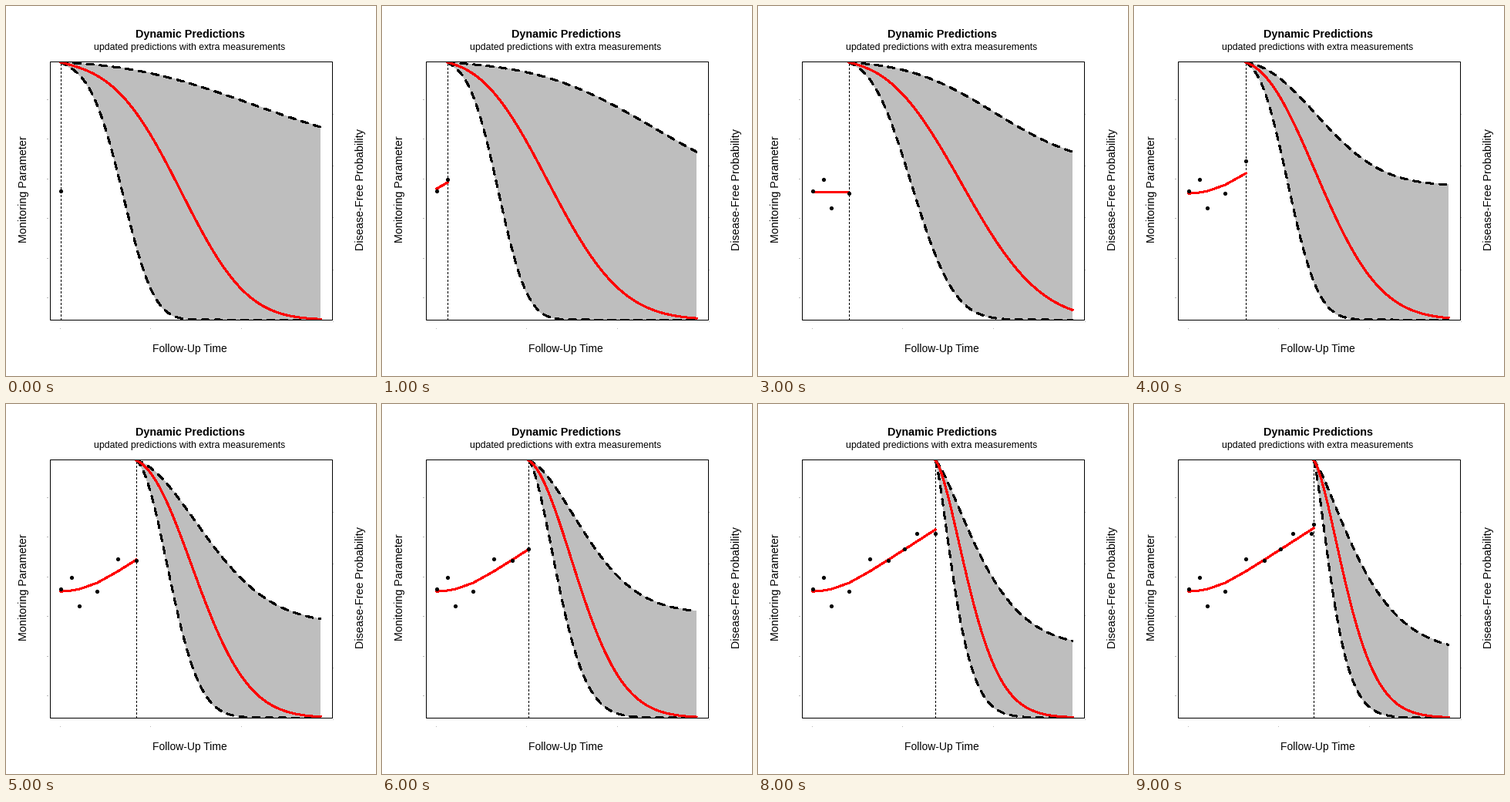
Recreate the animation shown at these times as a matplotlib script. Size 480 by 480 pixels, loop 10 s.

```python
import numpy as np
import matplotlib.pyplot as plt
from matplotlib.animation import FuncAnimation
from matplotlib.patches import Rectangle

DPI = 80
PX = 72 / DPI
LEFT, RIGHT, TOP, BOTTOM = 57, 423, 72, 407
START_Y, FULL, END = 73, 334, 408

VISITS_X = [71, 85, 95, 118, 145, 169, 190, 206, 230, 233]
VISITS_Y = [240, 225, 262, 243, 201, 203, 188, 168, 168, 156]

# Start of follow-up: depth, scale, shape of the upper limit,
# then scale, shape of the median and of the lower limit
CURVES = {
    71: (120, 330, 2.5, 188, 3.0, 95, 3.2),
    85: (170, 323, 3.0, 171, 2.5, 80, 2.9),
    95: (110, 318, 3.4, 238, 2.9, 132, 2.7),
    145: (160, 132, 2.2, 130, 2.2, 71, 2.5),
    169: (212, 128, 1.9, 108, 2.1, 61, 2.05),
    206: (188, 83, 1.75, 77, 1.8, 50, 1.6),
    233: (250, 83, 1.4, 60, 1.65, 35, 1.45),
}

# First and last height of the straight early trends
EARLY_TRENDS = {1: (237, 229), 2: (241, 244), 3: (241, 242)}


def fall(u, depth, scale, shape):
    """Survival curve: steady risk plus a risk that grows with time."""
    s = u / scale
    return START_Y + depth * (1 - np.exp(-0.15 * s - s ** shape))


def prediction(start):
    columns = zip(*CURVES.values())
    depth, b1, k1, b2, k2, b3, k3 = [
        np.interp(start, list(CURVES), c) for c in columns]
    x = np.linspace(start, END, 120)
    u = x - start
    return x, fall(u, depth, b1, k1), fall(u, FULL, b2, k2), fall(u, FULL, b3, k3)


def trend_line(k):
    """Straight at first, later flat with a soft bend into a steady rise."""
    x = np.array(VISITS_X[:k + 1], float)
    if k in EARLY_TRENDS:
        return x, np.interp(x, x[[0, -1]], EARLY_TRENDS[k])
    return x, 244 - 9 * np.log1p(np.exp((x - 104) / 14))


fig = plt.figure(figsize=(6, 6), dpi=DPI, facecolor="white")
ax = fig.add_axes([0, 0, 1, 1])
ax.set_xlim(0, 480)
ax.set_ylim(480, 0)
ax.axis("off")


def label(x, y, text, size, **kw):
    ax.text(x, y, text, fontsize=size * PX, family="Liberation Sans",
            ha="center", va="baseline", **kw)


def side_label(x, text):
    label(x, 238, text, 14.4, rotation=90, rotation_mode="anchor")


def tick(x, y, w=1):
    ax.add_patch(Rectangle((x, y), w, 1, fc="#b8b8b8", lw=0))


label(239.5, 41.5, "Dynamic Predictions", 14.4, weight="bold")
label(238.5, 57.5, "updated predictions with extra measurements", 12.3)
label(238.5, 449.5, "Follow-Up Time", 13.9)
side_label(27, "Monitoring Parameter")
side_label(464, "Disease-Free Probability")

for i in range(6):
    tick(53, round(121 + 51.4 * i), 2)
for i in range(5):
    tick(424, round(140 + 67.25 * i))
for i in range(3):
    tick(round(70 + 117.4 * i), 418)

ax.add_patch(Rectangle((LEFT, TOP), RIGHT - LEFT, BOTTOM - TOP, fill=False,
                       ec="black", lw=PX, zorder=5))
clip = Rectangle((LEFT, TOP), RIGHT - LEFT + 1, BOTTOM - TOP + 1,
                 transform=ax.transData)


def line(color, width, z, **kw):
    item, = ax.plot([], [], color=color, lw=width * PX, zorder=z,
                    antialiased=False, **kw)
    item.set_clip_path(clip)
    return item


area, = ax.fill([0, 0, 0], [0, 0, 0], color="#bebebe", lw=0, zorder=1,
                antialiased=False)
area.set_clip_path(clip)
now = line("black", 1, 2, ls=(0, (2, 2)), dash_capstyle="butt")
dash = dict(ls=(0, (4, 4)), dash_capstyle="round")
high = line("black", 2, 3, **dash)
low = line("black", 2, 3, **dash)
mid = line("red", 2, 4)
trend = line("red", 2, 4)
dots = line("black", 0, 6, marker="o", ms=5.2 * PX, mew=0)


def draw(k):
    start = VISITS_X[k]
    x, up, med, lo = prediction(start)
    area.set_xy(np.column_stack([np.append(x, x[::-1]),
                                 np.append(up, lo[::-1])]))
    high.set_data(x, up)
    mid.set_data(x, med)
    low.set_data(x, lo)
    now.set_data([start, start], [BOTTOM, TOP])
    trend.set_data(*trend_line(k) if k else ([], []))
    dots.set_data(VISITS_X[:k + 1], VISITS_Y[:k + 1])
    return area, now, high, low, mid, trend, dots


anim = FuncAnimation(fig, draw, frames=10, interval=1000, repeat=True,
                     repeat_delay=0, blit=False)
plt.show()
```
